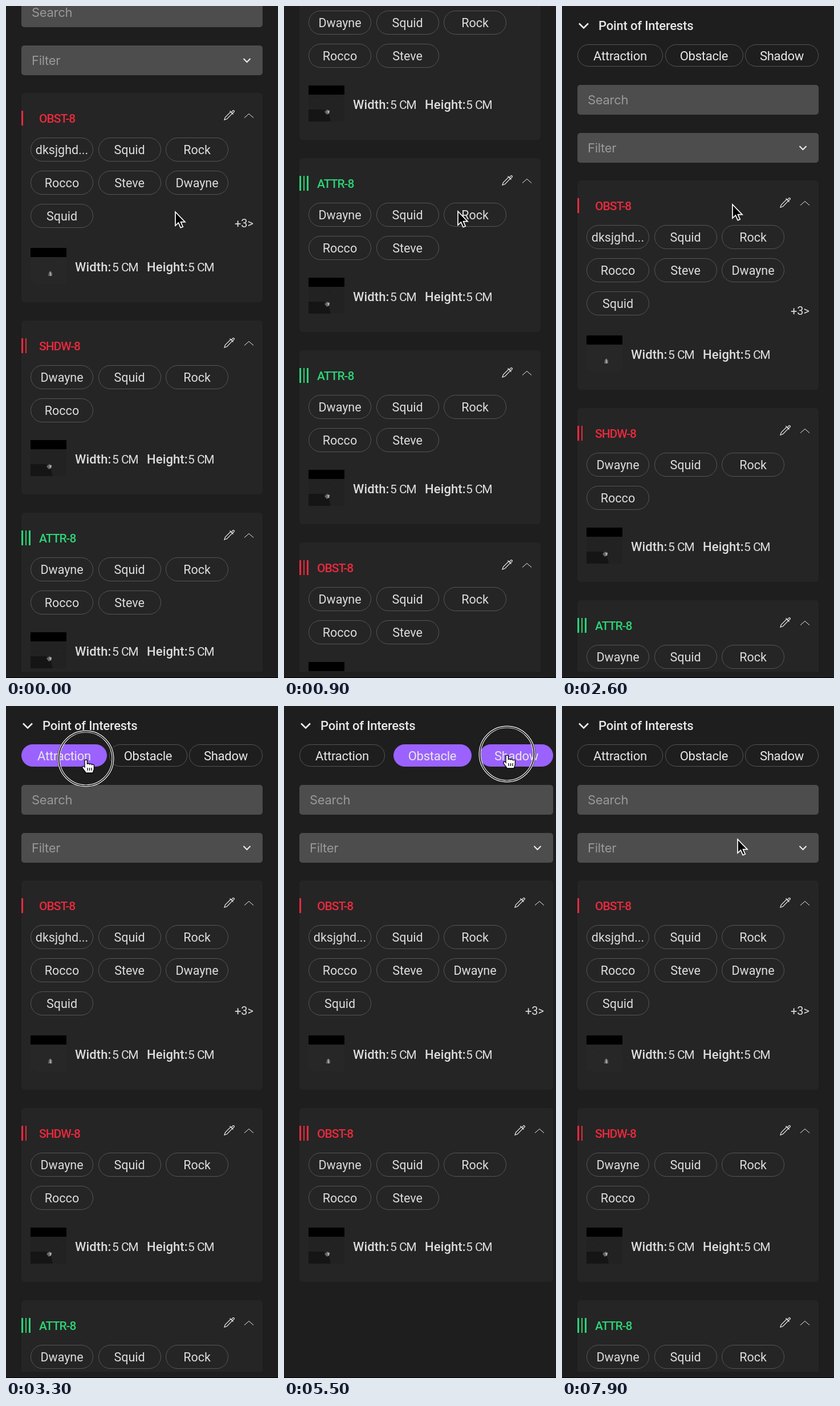
An HTML page that plays this animation: 477x1175 px, repeating every 8 s.

```html
<!DOCTYPE html>
<html lang="en">
<head>
<meta charset="utf-8">
<title>Point of Interests</title>
<style>
  html, body { margin: 0; width: 100%; height: 100%; overflow: hidden; background: #1e1e1e; }
  body { position: relative; color: #e8e8e8; font: 22px/26px Roboto, sans-serif; letter-spacing: -.25px; }
  svg { position: absolute; overflow: visible; fill: none; stroke: #eee; }
  #view { position: absolute; left: 0; top: 0; width: 100%; height: 1164px; overflow: hidden; }
  #panel { position: absolute; left: 27px; top: 0; width: 423px; }
  #panel.wide { width: 445px; }
  #edge { position: absolute; top: 1174px; width: 100%; height: 1px; background: #000; }
  .abs { position: absolute; white-space: pre; }
  h1 { position: absolute; left: 37px; top: 22px; margin: 0; font: 500 22px/26px Roboto, sans-serif; letter-spacing: -.2px; }
  #tabs { position: absolute; top: 66.5px; width: 100%; display: flex; justify-content: space-between; }
  .pill { box-sizing: border-box; border: 1.5px solid #555; border-radius: 21px; text-align: center; }
  #tabs .pill { height: 39.5px; line-height: 40px; }
  #tabs .on { background: #9b62ff; border-color: #9b62ff; }
  .field { position: absolute; box-sizing: border-box; width: 100%; height: 52px; padding-left: 18px; border-radius: 5px;
    background: #4d4d4d; color: #999; font: 22px/53px Inter, sans-serif; letter-spacing: -.3px; }
  #cards { position: absolute; top: 305px; width: 100%; }
  .card { position: relative; margin-bottom: 32px; border-radius: 6px; background: #252525; color: #ddd; }
  .bar { position: absolute; top: 31px; width: 2.7px; height: 26px; background: currentColor; }
  .name { left: 31px; top: 32px; font-weight: 500; font-size: 21px; letter-spacing: -1px; }
  .tag { position: absolute; width: 110px; height: 42px; line-height: 42px; font-size: 21.5px; letter-spacing: 0; }
  .more { right: 16px; top: 215px; font-size: 20px; letter-spacing: 0; }
  .size { bottom: 48px; }
  .size b { font-weight: 500; letter-spacing: .1px; }
  .unit { bottom: 48px; font-size: 21px; letter-spacing: -1.5px; word-spacing: 2px; }
  .photo { left: 16px; bottom: 32px; stroke: none; }
</style>
</head>
<body>
<div id="view">
  <div id="panel">
    <svg style="left:2px;top:30px" width="18" height="10" stroke-width="2.6"><path d="M1 .5l8 8 8-8"/></svg>
    <h1>Point of Interests</h1>
    <div id="tabs">
      <div class="pill" style="width:150px">Attraction</div>
      <div class="pill" style="width:137px">Obstacle</div>
      <div class="pill" style="width:129px">Shadow</div>
    </div>
    <div class="field" style="top:137.5px">Search</div>
    <div class="field" style="top:221.5px">Filter
      <svg style="right:21px;top:22px" width="13" height="8" stroke-width="2"><path d="M.5 1l6 6 6-6"/></svg>
    </div>
    <div id="cards"></div>
  </div>
</div>
<div id="edge"></div>
<svg id="pointer" style="left:0;top:0" width="1" height="1">
  <g id="ripple"><circle r="48" stroke="#000" stroke-width="4"/><circle r="48.8" stroke-width="1.4"/><circle r="46" stroke-width="1.2"/></g>
  <path id="arrow" d="M0 0V24l5.4-5 3.8 8.7 4-1.7-3.7-8.4H17z" fill="#000" stroke="#fff" stroke-width="1.7"/>
  <g id="hand" stroke="#000" stroke-width="1.3">
    <path fill="#fff" d="M-2 15V4a2.2 2.2 0 0 1 4.4 0v6c0-2 4-2 4 0v.6c0-2 4-2 4 0v1c0-2 4-2 4 0V17c0 4-1.5 4-2 8H0c-1-3-4-5-6-9-1-2 2-4 4-1z"/>
    <path d="M3 16v5M6.5 16v5M10 16v5"/>
  </g>
</svg>
<script>
const LOOP = 8000, STEP = 100;
const RED = '#ed293d', GREEN = '#2bd576';
const $ = id => document.getElementById(id);

// name, bars, colour, tab, tags
const basic = ['Dwayne', 'Squid', 'Rock', 'Rocco', 'Steve'];
const attraction = ['ATTR-8', 3, GREEN, 0, basic];
const items = [
  ['OBST-8', 1, RED, 1, ['dksjghd...', 'Squid', 'Rock', 'Rocco', 'Steve', 'Dwayne', 'Squid']],
  ['SHDW-8', 2, RED, 2, basic.slice(0, 4)],
  attraction, attraction, attraction,
  ['OBST-8', 3, RED, 1, basic]
];

function photo(first) {
  const scene = first
    ? '<path fill="#272727" d="M0 16h63v47H9l-3-3H0z"/><path fill="#666" d="M31 49l1-6 3-3 3 4v5z"/><path fill="#aaa" d="M34 49v-8l2 3v5z"/>'
    : '<path fill="#222" d="M0 16h63v47H0z"/><path fill="#151515" d="M0 42h27l9 9 3 12H0z"/><path fill="#666" d="M28 46l5-4 4 2-1 5-4 2z"/><path fill="#aaa" d="M33 44h4l-1 5h-2z"/>';
  return `<svg class="photo" width="63" height="63">${scene}<path fill="#000" d="M0 0h63v16H0z"/>
    <path fill="#393939" d="M12 27h1v1h-1zM46 24h1v1h-1zM54 31h1v1h-1zM20 35h1v1h-1zM51 40h1v1h-1z"/></svg>`;
}

function card([name, bars, color, , tags]) {
  const long = tags.length > 6;
  let html = `<div class="card" style="height:${long ? 366 : 304}px"><div style="color:${color}">`;
  for (let i = 0; i < bars; i++) html += `<i class="bar" style="left:${i * 6.7}px"></i>`;
  html += `<span class="abs name">${name}</span></div>
    <svg style="right:49px;top:29px" width="19" height="19" stroke-width="1.2">
      <path d="M1 18l1.5-4.5L12 4l2.8 2.8L5.5 16.5zM10.5 2.5l6 6M13.3 5.2l2.2-3c1.4-1.6 3.8.4 2.4 2l-3 2.4"/></svg>
    <svg style="right:16px;top:36px" width="16" height="8" stroke-width="1"><path d="M0 7.5l8-7 8 7"/></svg>`;
  tags.forEach((tag, i) => {
    html += `<div class="pill tag" style="left:${16 + i % 3 * 118.5}px;top:${77.5 + Math.floor(i / 3) * 58.4}px">${tag}</div>`;
  });
  if (long) html += '<span class="abs more">+3&gt;</span>';
  return html + photo(long) + `
    <span class="abs size" style="left:94px"><b>Width:</b></span><span class="abs unit" style="left:159px">5 CM</span>
    <span class="abs size" style="left:220px"><b>Height:</b></span><span class="abs unit" style="left:292px">5 CM</span></div>`;
}

$('cards').innerHTML = items.map(card).join('');
const cards = [...$('cards').children];
const tabs = [...$('tabs').children];

const scrollKeys = [[0, 153], [1100, 1200], [1300, 1200], [1900, 0]];
const cursorKeys = [
  [0, 297, 360], [900, 305, 359], [1300, 305, 359], [1900, 299, 347], [2600, 299, 347],
  [3100, 140, 92], [3700, 140, 92], [4300, 256, 94], [4600, 256, 94], [4900, 266, 90],
  [5000, 266, 90], [5400, 391, 84], [5800, 391, 84], [6200, 137, 82], [7500, 137, 82], [7900, 308, 233]
];
const clicks = [3200, 4300, 5400, 6200, 6800];
// time, loaded tab (-1 shows every card)
const loads = [[0, -1], [3500, 0], [4600, 1], [5800, 2], [6500, 0], [7200, -1]];

function track(keys, t) {
  const i = keys.findIndex(k => k[0] > t);
  if (i < 0) return keys[keys.length - 1].slice(1);
  const a = keys[i - 1], b = keys[i], u = (t - a[0]) / (b[0] - a[0]);
  return a.slice(1).map((v, n) => v + (b[n + 1] - v) * u * u * (3 - 2 * u));
}

function draw(t) {
  const [scroll] = track(scrollKeys, t);
  const [x, y] = track(cursorKeys, t);
  const selected = loads.filter(l => l[0] <= t).pop()[1];
  const wide = selected > 0;

  $('panel').className = wide ? 'wide' : '';
  $('panel').style.transform = `translateY(${-Math.round(scroll)}px)`;
  cards.forEach((el, i) => {
    el.style.display = selected < 0 || items[i][3] === selected ? '' : 'none';
  });

  const starts = wide ? [27, 191, 343] : [27, 180, 321];
  const over = y > 66 && y < 106 && scroll < 1
    ? starts.findIndex((s, i) => x >= s && x <= s + [150, 137, 129][i]) : -1;
  tabs.forEach((el, i) => el.classList.toggle('on', i === selected || i === over));

  $('pointer').style.transform = `translate(${x}px, ${y}px)`;
  $('hand').style.display = over < 0 ? 'none' : '';
  $('arrow').style.display = over < 0 ? '' : 'none';
  $('ripple').style.display = clicks.some(c => t >= c && t < c + 200) ? '' : 'none';
}

const start = performance.now();
function frame() {
  const t = (performance.now() - start) % LOOP;
  draw(Math.floor(t / STEP) * STEP);
  requestAnimationFrame(frame);
}
frame();
</script>
</body>
</html>
```
